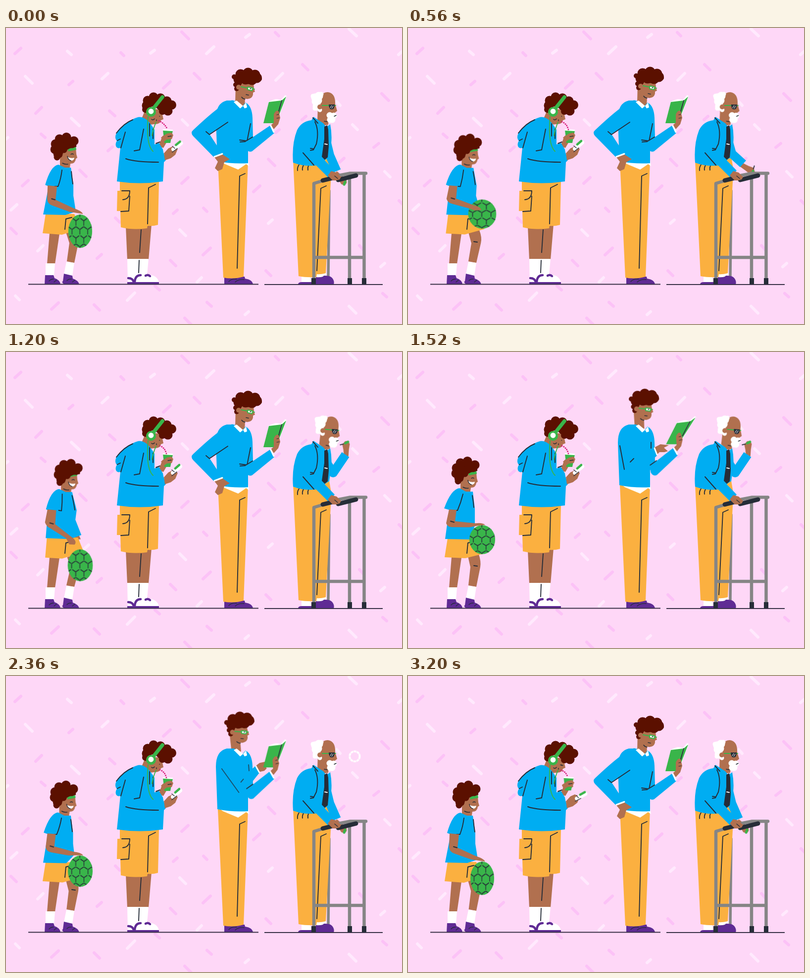
Animation, 800 px wide and 600 px high, one loop 3.24 s. Source, as an HTML page without scripts:

```html
<!DOCTYPE html>
<html lang="en">
<head>
<meta charset="utf-8">
<title>Four ages</title>
<style>
html, body { margin: 0; width: 100%; height: 100%; overflow: hidden; background: #fed7f7; }
svg { display: block; width: 100vw; height: 100vh; }
.skin { fill: #b1704f; }
.blue { fill: #00adf2; }
.gold { fill: #fbb040; }
.green { fill: #39b54a; }
.plum { fill: #5f2b94; }
.white { fill: #fff; }
.dark { fill: #262d38; }
.hair { fill: #5b1000; }
.curls { stroke: #5b1000; }
.curls, .fluff { fill: none; stroke-linecap: round; }
.fluff { stroke: #fff; }
.ink, .line { fill: none; stroke: #262d38; stroke-width: 1.9; stroke-linecap: round; stroke-linejoin: round; }
.line { stroke: #fff; stroke-width: 3; }
.lime { stroke: #39b54a; }
.bits { fill: none; stroke-width: 6; stroke-linecap: round; }
.tube { fill: none; stroke: #858585; stroke-width: 6.5; stroke-linecap: round; stroke-linejoin: round; }

/* boy: one bounce */
.boy * { animation: 810ms linear infinite; }
.boy .ball { animation-name: ball; }
.boy .curlset { animation-name: curlset; transform-origin: 118px 240px; }
.boy .face { animation-name: face; }
.boy .tee { animation-name: tee; }
.boy .arm { animation-name: arm; }
.boy .palm { animation-name: palm; }
.boy .shorts { animation-name: shorts; }
.boy .leg { animation-name: leg; }
.boy .folds { animation-name: folds; }
.boy .crook { animation-name: crook; }
@keyframes ball {
  0%, 95%, 100% { transform: translate(150px, 410px) scale(.83, 1.17); }
  3.7% { transform: translate(150px, 465px) scale(.9, 1.07); }
  10% { transform: translate(150px, 487px) scale(1.04, .95); }
  22% { transform: translate(150px, 488px) scale(1.04, .96); }
  30.9%, 34.6% { transform: translate(150px, 484px); }
  42% { transform: translate(150px, 457px) scale(.87, 1.12); }
  56% { transform: translate(150px, 402px) scale(.88, 1.1); }
  72% { transform: translate(150px, 372px); }
  87.7% { transform: translate(150px, 380px) scale(.9, 1.01); }
}
@keyframes curlset {
  0%, 95%, 100% { transform: none; }
  3.7% { transform: translate(2px, 0); }
  30.9%, 34.6% { transform: translate(12.5px, 5px) rotate(7deg); }
  42% { transform: translate(9px, 5px) rotate(6deg); }
  87.7% { transform: translate(-2px, 0); }
}
@keyframes face {
  0%, 95%, 100% { transform: none; }
  3.7% { transform: translate(2px, 0); }
  30.9%, 34.6% { transform: translate(6.5px, 4px); }
  42% { transform: translate(3px, 4px); }
  87.7% { transform: translate(-3px, 0); }
}
@keyframes tee {
  95% { d: path("M106 277L119 283L131 283L136 318L136 340L141 372L120 379L75 378L86 321L79 318Q90 279 106 277Z"); }
  3.7% { d: path("M108 277L121 283L134 284L141 321L139 340L145 377L125 380L77 377L88 321L84 321Q92 279 108 277Z"); }
  30.9%, 34.6% { d: path("M111 278L122 284L135 284L144 322L142 340L154 374L130 378L81 377L87 322L84 321Q93 280 111 278Z"); }
  42% { d: path("M108 278L121 284L134 284L144 321L141 340L155 374L130 379L81 377L85 321L82 319Q91 280 108 278Z"); }
  87.7% { d: path("M104 276L117 283L131 283L135 318L135 340L135 352L124 380L75 379L83 320L73 317Q87 278 104 276Z"); }
}
@keyframes arm {
  95% { d: path("M84 319L83 347Q84 357 94 360L128 372L142 374L156 376Q153 370 137 365L100 348L103 321Z"); }
  3.7% { d: path("M89 321L87 348Q88 357 96 362L128 388L133 400L141 404Q148 392 133 383L105 353L105 321Z"); }
  30.9%, 34.6% { d: path("M86 320L82 348Q83 354 91 360L112 389L114 408L127 409Q134 402 121 384L103 352L104 321Z"); }
  42% { d: path("M84 319L79 345Q82 354 90 358L121 381L126 396L136 397Q144 389 130 378L100 350L102 321Z"); }
  87.7% { d: path("M83 319L77 347Q79 354 88 355L124 355L140 352L156 350Q150 345 136 347L95 343L98 320Z"); }
}
@keyframes palm {
  0%, 60%, 100% { transform: translate(-28px, -24px); }
  3.7% { transform: translate(-9px, 3px); }
  30.9%, 34.6% { transform: none; }
  42% { transform: translate(-5px, 0); }
}
@keyframes shorts {
  95% { d: path("M80 377L138 377L148 408L113 419L74 416Z"); }
  3.7% { d: path("M81 376L143 377L152 408L117 419L75 416Z"); }
  30.9%, 42% { d: path("M83 376L147 376L158 405L113 419L80 417Z"); }
  87.7% { d: path("M80 378L135 378L152 409L116 418L74 416Z"); }
}
@keyframes leg {
  3.7% { d: path("M122 415L145 410Q151 425 148 436L138 476L122 473L129 436Z"); }
  30.9%, 42% { d: path("M124 416L146 410Q153 425 149 436L138 476L122 473L131 437Z"); }
  87.7% { d: path("M121 414L143 410Q148 425 146 436L138 476L122 473L126 436Z"); }
}
@keyframes folds {
  95% { d: path("M113 288Q111 305 105 321L98 321M132 291Q133 303 135 316"); }
  3.7% { d: path("M113 289Q113 305 112 323L106 322M134 291Q136 303 138 317"); }
  30.9%, 34.6% { d: path("M118 289Q119 305 120 323L113 324M135 291Q138 303 140 321"); }
  42% { d: path("M114 288Q115 305 114 322L108 321M134 291Q137 303 140 321"); }
  87.7% { d: path("M111 288Q107 305 100 321L97 321M130 291Q132 303 133 315"); }
}
@keyframes crook {
  0%, 95%, 100% { transform: none; }
  3.7% { transform: translate(5px, 4px); }
  30.9%, 34.6% { transform: translate(2px, 3px) rotate(2deg); }
  42% { transform: translate(-3px, 1px); }
  87.7% { transform: translate(-6px, -3px); }
}

/* teen: sip and tap */
.teen * { animation: 1080ms ease-in-out infinite; }
.teen .cup { animation-name: cup; }
.teen .straw { animation-name: straw; }
.teen .phone { animation-name: phone; }
.teen .head { animation-name: nod; }
.teen .lid { animation: lid 1080ms steps(1) infinite; }
@keyframes cup {
  0%, 4%, 52%, 100% { transform: none; }
  58%, 97% { transform: translate(-2.5px, -1px); }
}
@keyframes straw {
  4%, 52% { d: path("M311 190Q321 194 324 206"); }
  58%, 97% { d: path("M309 191Q318 193 322 203"); }
}
@keyframes phone {
  0%, 100% { transform: translate(1px, 1px) rotate(2deg); }
  4%, 52% { transform: none; }
  58%, 97% { transform: translate(4px, 4px) rotate(12deg); }
}
@keyframes nod {
  0%, 4%, 52%, 100% { transform: none; }
  58%, 97% { transform: translate(0, 1px); }
}
@keyframes lid {
  0%, 100% { opacity: 0; }
  56% { opacity: 1; }
  98% { opacity: 0; }
}

/* man: turn a page */
.man *, .elder * { animation: 3240ms ease-in-out infinite; }
.man .reach { animation-name: reach; }
.man .fingers { animation-name: fingers; }
.man .cuff { animation-name: cuff; }
.man .head { animation-name: look; transform-origin: 473px 155px; }
.man .book { animation-name: book; transform-origin: 545px 190px; }
.man .fore { animation-name: fore; transform-origin: 488px 238px; }
.man .akimbo { animation-name: akimbo; }
.man .bent { animation-name: bent; }
@keyframes reach {
  38%, 88% { d: path("M458 146Q438 150 378 207Q372 212 378 219L420 262L437 255L411 215L446 192Z"); }
  46.9%, 76% { d: path("M440 150Q426 165 432 200Q450 245 470 240L503 210L497 194L460 215L456 170Z"); }
  54%, 70% { d: path("M440 150Q426 165 436 200Q462 240 480 244L520 184L510 172L478 212L460 170Z"); }
  82.7% { d: path("M456 146Q436 150 373 206Q368 212 374 219L411 262L428 257L407 215L446 192Z"); }
}
@keyframes fingers {
  38%, 88% { d: path("M421 262L437 256L452 266L441 272L437 286L428 290L422 284L428 271Z"); }
  46.9%, 76% { d: path("M503 208L497 194L510 187L527 189L517 194L525 201L518 203L508 203Z"); }
  54%, 70% { d: path("M519 183L511 172L514 167L523 160L528 165L528 176L525 183L521 186Z"); }
  82.7% { d: path("M425 261L432 258L444 270L437 272L436 290L429 292L425 286L425 270Z"); }
}
@keyframes cuff {
  38%, 88% { d: path("M421 261L437 255"); }
  46.9%, 76% { d: path("M503 208L498 195"); }
  54%, 70% { d: path("M519 184L511 173"); }
  82.7% { d: path("M412 262L428 257"); }
}
@keyframes look {
  0%, 100% { transform: translate(0, 1px); }
  9%, 38% { transform: translate(0, -1px); }
  46.9% { transform: translate(-5px, -4px) rotate(-5deg); }
  55%, 70% { transform: translate(-8px, -6px) rotate(-8deg); }
  82.7% { transform: translate(-5px, -4px) rotate(-5deg); }
  89% { transform: translate(0, -1px); }
}
@keyframes book {
  0%, 38%, 88%, 100% { transform: none; }
  46.9% { transform: translate(2px, -6px) skewX(-14deg); }
  55%, 70% { transform: translate(0, -8px); }
  82.7% { transform: translate(-3px, -5px); }
}
@keyframes fore {
  0%, 38%, 88%, 100% { transform: none; }
  46.9% { transform: translate(5px, 0) rotate(-4deg); }
  55%, 70% { transform: translate(2px, -1px) rotate(-4deg); }
  82.7% { transform: rotate(-3deg); }
}
@keyframes akimbo {
  0%, 39%, 100% { opacity: 1; transform: none; }
  41%, 77% { opacity: 0; }
  82.7% { opacity: 1; transform: translate(-4px, 0); }
}
@keyframes bent {
  0%, 42%, 78%, 100% { opacity: 0; }
  46.9% { opacity: 1; d: path("M428 190L437 238M449 223L456 216M491 183L491 195"); }
  55%, 70% { opacity: 1; d: path("M436 188L471 236M475 215L480 209M490 180L491 192"); }
}

/* elder: raise hand, puff, ring */
.elder .far { animation-name: far; }
.elder .hand { animation-name: hand; }
.elder .head { animation-name: lean; transform-origin: 643px 195px; }
.elder .ring { animation-name: ring; }
@keyframes far {
  13%, 70% { d: path("M646 225L654 258L668 290"); }
  25.9% { d: path("M644 220L655 244L706 227"); }
  32%, 47% { d: path("M646 222L661 245L686 208"); }
  60.5% { d: path("M644 225L652 254L695 246"); }
}
@keyframes hand {
  0%, 13%, 70%, 100% { transform: translate(668px, 296px) rotate(50deg); }
  25.9% { transform: translate(705px, 223px) rotate(-10deg); }
  32%, 47% { transform: translate(687px, 208px) rotate(-86deg); }
  60.5% { transform: translate(697px, 246px) rotate(-8deg); }
}
@keyframes lean {
  0%, 13%, 73%, 100% { transform: none; }
  25.9% { transform: translate(2px, 0) rotate(2deg); }
  32%, 47% { transform: translate(3px, 0) rotate(5deg); }
  55%, 61% { transform: translate(4px, 1px) rotate(7deg); }
}
@keyframes ring {
  0%, 56.9% { opacity: 0; transform: translate(682px, 181px) scale(.2); stroke-width: 8; }
  57% { opacity: 1; transform: translate(682px, 181px) scale(.2); stroke-width: 8; }
  60.5% { opacity: 1; transform: translate(691px, 177px) scale(.42); stroke-width: 11; stroke-dasharray: 8 0; animation-timing-function: ease-out; }
  82.7% { opacity: 1; transform: translate(709px, 158px) scale(.95); stroke-width: 2.4; stroke-dasharray: 6.5 1.5; }
  98%, 100% { opacity: 0; transform: translate(714px, 150px) scale(1.25); stroke-width: .6; stroke-dasharray: 2 6; }
}
</style>
</head>
<body>
<svg viewBox="0 0 800 600">
<defs>
  <pattern id="hex" width="19" height="30" patternUnits="userSpaceOnUse" patternTransform="translate(-1 -8)">
    <path class="ink" style="stroke-width:1.7" d="M2 16L9.500 20L17 16M0 5L9.500 0L17 4M9.500 20V28M0 5V13M19 5V13"/>
  </pattern>
</defs>
<rect width="800" height="600" fill="#fed7f7"/>

<g class="bits" stroke="#fcc2f7">
  <path d="M18 52l12-11M127 115l8-7M60 173l12-12M318 122l14-13M206 249l9-8M33 320l12-11M355 315l13-12M338 376l8-7M184 467l9-8M92 570l14-13M500 332l13-12M398 460l15-14M545 212l7-6M598 186l8-7M743 242l10-8M674 272l9-8"/>
  <path d="M232 50l6 6M355 8l14 14M380 92l12 12M71 215l8 7M149 288l13 13M10 406l11 11M178 561l11 11M209 168l11 10M544 9l7 7M599 74l11 11M530 266l13 13M399 365l7 7M332 471l11 11M406 556l9 8M525 492l10 10M361 588l14 14M759 133l14 14M761 538l8 7M301 523l9 8M221 385l9 9M794 350l8 8M714 441l9 10"/>
</g>
<g class="bits" stroke="#ffe9fd">
  <path d="M194 103l12-11M292 51l8-6M405 52l15-14M484 19l8-6M545 106l14-14M793 54l10-9M10 369l12-11M64 452l11-11M245 552l15-15M386 515l9-9M530 396l8-7M757 484l8-7M483 581l7-6M-4 228l8-6M156 401l11-10"/>
  <path d="M39 98l14 14M124 47l8 7M693 2l15 14M132 183l16 15M19 543l8 8M351 409l12 12M356 186l11 11M765 291l11 11M700 196l10 10M693 564l14 14M668 149l7 8"/>
</g>

<g class="boy">
  <path class="skin" d="M88 416L108 417L99 478L83 478Z"/>
  <path class="skin leg" d="M121 414L143 410Q148 425 146 436L138 476L123 473L128 436Z"/>
  <path class="ink" d="M133 433l7 1"/>
  <path class="white" d="M80 477h19l-2 25h-17ZM122 474l16 2l-4 26l-17-3Z"/>
  <path class="skin palm" d="M143 370L152 376L161 381L164 388L160 388L161 393L157 391L154 395L149 389Z"/>
  <path class="gold shorts" d="M80 377L138 377L148 408L113 419L74 416Z"/>
  <path class="ink" d="M133 384L121 387L119 408"/>
  <g class="face">
    <path class="skin" d="M109 244L141 244L142 256L144 263L141 265Q140 275 130 275L128 288L119 289L109 284Z"/>
    <path class="green" d="M124 244L141 241L142 247L126 250Z"/>
    <path class="white" d="M124 261Q130 265 138 263Q137 269 131 269Q126 267 124 261Z"/>
    <path class="ink" d="M124 260Q125 267 131 269M131 256q3-2 5 0M114 274q5 3 11 2" style="stroke-width:1.5"/>
  </g>
  <g class="curlset">
    <path class="hair" d="M98 228L122 220L142 232L142 241L129 244L116 251L112 262L100 258Z"/>
    <path class="curls" stroke-width="19" d="M122 221.500h0M108 225h0M137 229h0M100 235h0M99 246h0M105 255h0M126 233h0"/>
    <path class="curls" stroke-width="13" d="M103 262h0M117 247h0M134 237h0"/>
  </g>
  <path class="blue tee" d="M106 277L119 283L131 283L136 318L136 340L141 372L120 379L75 378L86 321L79 318Q90 279 106 277Z"/>
  <path class="ink folds" d="M113 288Q111 305 105 321L98 321M132 291Q133 303 135 316"/>
  <g class="ball" transform="translate(150 410)">
    <circle class="green" r="29"/>
    <circle r="29" fill="url(#hex)"/>
  </g>
  <path class="skin arm" d="M84 319L83 347Q84 357 94 360L128 372L142 374L156 376Q153 370 137 365L100 348L103 321Z"/>
  <path class="ink crook" d="M92 346l7 2"/>
  <path class="plum" d="M79 501H96L98 507Q110 511 110 520H78ZM117 498L134 502L135 508Q147 512 148 520H118Q111 515 115 513Z"/>
  <path class="ink" style="stroke-width:1.3" d="M87 513q3-4 9-4M97 515l5-4M123 512q4-4 9-3M134 515l5-4"/>
</g>

<g class="teen">
  <path class="skin" d="M242 402L294 398L288 470H245Z"/>
  <path class="white" d="M245 468H288L285 500Q306 500 309 516H246Z"/>
  <path class="plum" d="M245 515H309V520H245Z"/>
  <path fill="none" stroke="#5f2b94" stroke-width="4.500" stroke-linecap="round" d="M247 507Q256 507 258 515M260 515Q261 501 272 501M282 502Q287 499 291 503"/>
  <path class="ink" d="M273 409L270 455M269 471L268 496"/>
  <path class="gold" d="M230 311L309 312L307 399Q297 402 286 401L285 406Q256 410 232 404L231 371L224 371L225 330H230Z"/>
  <path class="ink" d="M302 317L288 324L286 397M234 330H250Q250 347 236 348M250 341L248 371L232 372"/>
  <g class="head">
    <path class="skin" d="M273 186L283 162L314 166L318 185L313 187Q312 195 300 195L290 196Z"/>
    <path class="hair" d="M287 146L300 138L326 147L328 168L318 172L308 166L300 158L286 162Z"/>
    <path class="curls" stroke-width="19" d="M298 140h0M286 147h0M284 157h0M312 142h0M325 148h0M334.500 156h0M327 168h0M306 148h0"/>
    <path class="curls" stroke-width="14" d="M282 165h0M316 169h0"/>
    <path class="lime" fill="none" stroke-width="7.500" stroke-linecap="round" d="M316 140L297 164"/>
    <circle class="green" cx="293" cy="170" r="10"/>
    <circle class="white" cx="293" cy="169" r="5.400"/>
    <path class="ink" style="stroke-width:1.5" d="M294 185q3 3 6-1M310 179h.5M304 188v-2"/>
    <path class="ink lid" style="stroke-width:1.5" d="M308 179q2 2 5 1"/>
  </g>
  <path class="skin" d="M308 240L316 219L327 214L334 224L325 231L318 243Z"/>
  <path class="blue" d="M266 181C280 178 290 190 300 206L300 236L309 233L317 246L318 252L323 268L319 272L317 311Q270 318 224 311L231 243C222 246 219 236 224 229C218 222 222 214 226 208Q248 186 266 181Z"/>
  <path class="ink" d="M223 213Q238 193 256 186M241 211L232 243M225 228l6-3M278 205L270 247L259 249M242 265Q262 272 308 272M290 194V219M297 205V224M303 234l8-3"/>
  <path class="ink lime" d="M287 180C284 210 286 240 297 250M303 191Q297 205 295 218"/>
  <g class="cup">
    <path class="green" d="M317 207L337 208L332 233H320Z"/>
    <path class="line" d="M318 206.500L336 207.500"/>
    <path class="skin" d="M313 222L325 214L334 212L338 217L335 225L325 226L318 231Z"/>
    <path class="ink" style="stroke-width:1.3" d="M327 220l7-1"/>
  </g>
  <path class="straw" fill="none" stroke="#d81f7c" stroke-width="3" stroke-linecap="round" stroke-dasharray="0 4.200" d="M309 188Q320 193 326 205"/>
  <path class="skin" d="M319 254L328 244L337 240L347 245L342 257L333 264L321 268Z"/>
  <g class="phone" style="transform-origin:340px 245px">
    <path class="line" stroke-linecap="butt" style="stroke-width:8" d="M337 245L352 232"/>
    <path class="line lime" style="stroke-width:4.5" d="M342 236L350 229"/>
    <path class="ink" style="stroke-width:1.4" d="M335 251L345 243M335 239l5 4"/>
  </g>
</g>

<g class="man">
  <path class="plum" d="M441 504H482L483 508Q498 510 499 520H441Z"/>
  <path class="ink" style="stroke-width:1.4" d="M450 514q5-6 16-5M463 515q6-6 18-5"/>
  <path class="gold" d="M428 270H489L480 504Q460 510 439 506Z"/>
  <path class="ink" d="M483 295L472 300L467 487"/>
  <path class="white" d="M428 266L489 268L491 280L485 276L469 287L438 274Z"/>
  <g class="head" transform="translate(0 1)">
    <path class="skin" d="M464 112L500 108L501 122L503 128L499 130Q500 142 487 143L483 142L482 160L471 160L463 152Z"/>
    <path class="hair" d="M462 98L486 88L510 95L507 108L492 113L477 111L469 124L462 126Z"/>
    <path class="curls" stroke-width="21" d="M474 93h0M489 90h0M503 94h0M497 104h0M484 103h0M470 103h0M506.500 100h0"/>
    <path class="curls" stroke-width="10" d="M464 114h0M466 122h0M461 98h0M512 102h0"/>
    <circle class="skin" cx="470" cy="119" r="5"/>
    <path class="line lime" style="stroke-width:2" d="M475 118L489 121M497 122l5 1"/>
    <path class="white" stroke="#39b54a" stroke-width="2" d="M488.500 118.500l10 2l-1.500 5.500l-9-2Z"/>
    <path class="ink" style="stroke-width:1.5" d="M493 122h2M485 134l5 1M476 139q3 4 7 4"/>
  </g>
  <path class="blue reach" d="M458 146Q438 150 378 207Q372 212 378 219L420 262L437 255L411 215L446 192Z"/>
  <path class="blue" d="M427 270L424 184Q424 152 446 147L461 147L478 158L484 151Q497 158 498 182L499 222L489 240V274Q458 276 427 270Z"/>
  <path class="white" d="M460 150L466 147L479 158L473 163ZM479 158L485 151L487 161L482 163Z"/>
  <path class="skin fingers" d="M421 262L437 256L452 266L441 272L437 286L428 290L422 284L428 271Z"/>
  <path class="line cuff" d="M421 261L437 255"/>
  <path class="ink akimbo" d="M404 210L411 216L448 191M494 194L487 229L472 227M473 231L486 230"/>
  <path class="ink bent" opacity="0" d="M428 190L437 238M449 223L456 216M491 183L491 195"/>
  <g class="book">
    <path class="white" d="M530 150Q545 141 555 146L564 136L567 138L550 184L530 190Z"/>
    <path class="green" d="M531 150L556 147L545 193L520 193ZM558 146L566 139L551 178L545 192Z"/>
    <path class="ink" d="M557 147L549 176"/>
  </g>
  <g class="fore">
    <path class="blue" d="M484 230L499 221L533 198L542 213L497 250Q489 253 485 244Z"/>
    <path class="ink" d="M485 229L498 221"/>
    <path class="skin" d="M541 192V175Q546 164 551 169L554 182L550 195L541 205L535 197Z"/>
    <path class="ink" style="stroke-width:1.2" d="M547 176l4-1M547 183l5-1"/>
    <path class="line" d="M535 198L541 211"/>
  </g>
</g>

<g class="elder">
  <path class="tube" style="stroke-width:5.5" d="M653 330L651 503"/>
  <path class="white" d="M597 500H615V517H597ZM627 497L647 496V506H627Z"/>
  <path class="plum" d="M590 520Q590 515 598 515H628V520ZM626 505Q640 506 642 502Q656 501 660 508Q664 514 662 520H626Z"/>
  <path class="gold" d="M580 268L652 255L657 285L656 312L646 497Q634 500 628 499L627 505Q606 506 591 503Z"/>
  <path class="ink" d="M647 320L636 325L628 492M592 277q-4 6-3 12M601 278q-3 6-2 10M611 279q-2 4-1 9"/>
  <g class="hand" transform="translate(668 296) rotate(50)">
    <path class="skin" d="M-4-4L9-6L20-9L27-4L28 2L22 6L11 5L-3 5Z"/>
    <path class="line lime" style="stroke-width:5" d="M23-3l3 5"/>
    <path class="ink" d="M21-7l-2-6"/>
  </g>
  <path class="far" fill="none" stroke="#00adf2" stroke-width="18" stroke-linejoin="round" d="M646 225L654 258L668 290"/>
  <g class="head">
    <path class="skin" d="M630 160Q632 130 650 130Q666 132 665 154L669 168L664 172L652 184L651 196L641 198L629 188Z"/>
    <path class="fluff" stroke-width="17" d="M625 141h0M632 138h0M626 149h0M628 159h0M630 147h0"/>
    <path class="fluff" stroke-width="9" d="M620 138h0M637 134h0M634 166h0M624 163h0"/>
    <circle class="skin" cx="634" cy="160" r="5"/>
    <path class="fluff" stroke-width="13" d="M654 177h0M662 178h0M659 186h0M655 186h0"/>
    <path class="line lime" style="stroke-width:2" d="M639 157H666"/>
    <path class="dark" d="M652 155H664Q664 165 658 165Q652 165 652 155Z"/>
    <path class="line" style="stroke-width:1" d="M655 162l3-5M658 163l3-5"/>
    <path class="ink" style="stroke-width:1.4" d="M663 179l4-2M643 189l6 1"/>
  </g>
  <path class="blue" d="M580 273Q577 235 588 207Q597 189 617 187L621 180L641 193L647 201L655 195Q659 215 657 235L653 262L646 266L638 276Q610 284 580 273Z"/>
  <path class="dark" d="M643 200L649 197L651 206L652 240L650 262L644 267L638 261L643 225Z"/>
  <path class="line" style="stroke-width:1.8" d="M644 235l5 1"/>
  <path class="ink" d="M620 182L630 193M624 190Q633 208 627 235L621 247L615 248M621 245l-6-1"/>
  <path class="blue" d="M598 250L626 250L664 289L651 303Z"/>
  <path class="ink" d="M600 253L622 278"/>
  <path class="tube" d="M622 510V315L642 309M672 299L695 294.500H727M694 298V508M723.500 298V508M622 465H722"/>
  <path class="ink" style="stroke-width:9" d="M640 309L660 304M671 308L707 299"/>
  <path class="dark" d="M617 507h9v13h-9ZM690 507h9v13h-9ZM719 507h9v13h-9Z"/>
  <path class="skin" d="M650 299L657 290L668 293L677 302L674 307L667 309L660 309Z"/>
  <path class="ink" style="stroke-width:1.3" d="M664 300l6 5"/>
  <circle class="ring" r="12.500" fill="none" stroke="#fff" stroke-width="8" opacity="0"/>
</g>
<path d="M45 519.500H510M522 520H761" stroke="#3a3348" stroke-width="1.800"/>
</svg>
</body>
</html>
```
